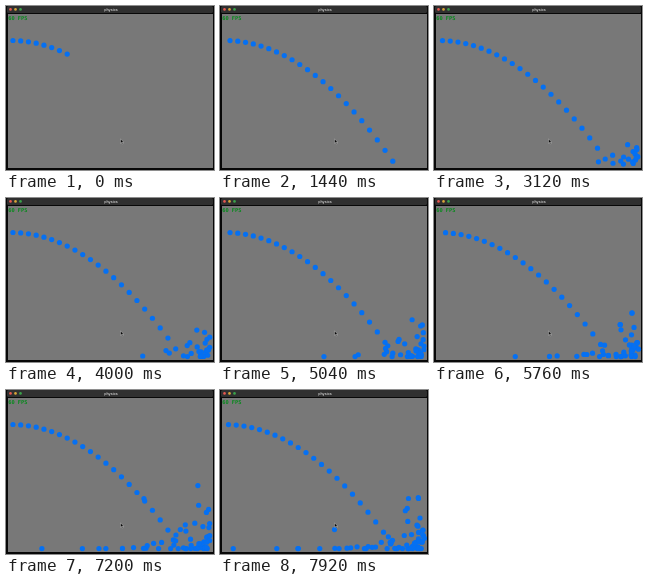
An HTML page for the animation above (8000 ms loop, 208 px wide and 164 px high).

```html
<!DOCTYPE html>
<html lang="en">
<head>
<meta charset="utf-8">
<title>physics</title>
<style>
  html, body { margin: 0; width: 100%; height: 100%; overflow: hidden; background: #000; }
  svg { display: block; width: 208px; height: 164px; }
  .title { font: bold 3.6px Inter, "Open Sans", sans-serif; fill: #bdbdbd; text-anchor: middle; }
  .fps { font: bold 5.3px "DejaVu Sans Mono", monospace; fill: #078a1c; }
</style>
</head>
<body>
<svg viewBox="0 0 208 164">
  <rect width="208" height="164" fill="#080808"/>
  <rect x="1" width="206" height="7" rx="1.5" fill="#303030"/>
  <circle cx="4.5" cy="3.4" r="1.3" fill="#e8574f"/>
  <circle cx="9.5" cy="3.4" r="1.3" fill="#d9a638"/>
  <circle cx="14.5" cy="3.4" r="1.3" fill="#3aa34a"/>
  <text class="title" x="105" y="4.7">physics</text>
  <rect x="2" y="8" width="205" height="154" fill="#787878"/>
  <text class="fps" x="2.2" y="13.8">60 FPS</text>
  <g id="balls" fill="#0570f2"></g>
  <path d="M114.5 133 v4.2 l1-.9 .8 1.6 .8-.4 -.8-1.5 h1.4z" fill="#000" stroke="#ddd" stroke-width=".4"/>
</svg>
<script>
const LOOP = 8000, STEP = 80;
const G = 51.5, SPEED = 77.5, RADIUS = 2.6;
const LEFT = 5, RIGHT = 204.5, TOP = 34.5, FLOOR = 158.6;
const FIRST = -0.725, GAP = 0.1, COUNT = 88;
const FALL = Math.sqrt(2 * (FLOOR - TOP) / G);
const SKID = (RIGHT - LEFT) / SPEED - FALL;
const REBOUND = 28;

const frac = v => v - Math.floor(v);

// Height s seconds into a hop lasting d seconds
const hop = (s, d) => G / 2 * s * (d - s);
const wallLift = REBOUND * SKID - G / 2 * SKID * SKID;

// Each ball leaves the corner with its own drift and its own first hop
const fates = Array.from({ length: COUNT }, (_, n) => ({
  drift: 34 * Math.pow(frac(0.97 + 0.618034 * n), 2.5),
  spread: 8 * frac(0.5698 * n),
  leap: 0.5 + (1.4 + n / 30) * frac(0.3 + 0.75488 * n)
}));

// Successive hops, each shorter than the last
function bounce(age, d) {
  while (age > d && d > 0.1) {
    age -= d;
    d *= 0.72;
  }
  return Math.max(0, hop(age, d));
}

function scatter({ drift, spread, leap }, age) {
  const x = RIGHT - drift * age - spread * Math.min(1, age);
  const settle = wallLift * Math.max(0, 1 - 2 * age);
  return {
    x: LEFT + Math.abs(x - LEFT),
    y: FLOOR - bounce(age, leap) - settle
  };
}

function place(n, t) {
  const age = t - FIRST - n * GAP;
  if (age < 0) return null;
  const x = LEFT + SPEED * age;
  if (age < FALL) return { x, y: TOP + G / 2 * age * age };
  const after = age - FALL;
  if (after < SKID) return { x, y: FLOOR - REBOUND * after + G / 2 * after * after };
  return scatter(fates[n], after - SKID);
}

const group = document.getElementById("balls");
const dots = fates.map(() => {
  const dot = document.createElementNS("http://www.w3.org/2000/svg", "circle");
  dot.setAttribute("r", RADIUS);
  return group.appendChild(dot);
});

function draw(ms) {
  const t = Math.floor(ms % LOOP / STEP) * STEP / 1000;
  dots.forEach((dot, n) => {
    const p = place(n, t);
    dot.setAttribute("visibility", p ? "visible" : "hidden");
    if (!p) return;
    dot.setAttribute("cx", p.x.toFixed(2));
    dot.setAttribute("cy", p.y.toFixed(2));
  });
}

const begin = performance.now();
function tick() {
  draw(performance.now() - begin);
  requestAnimationFrame(tick);
}
tick();
</script>
</body>
</html>
```
